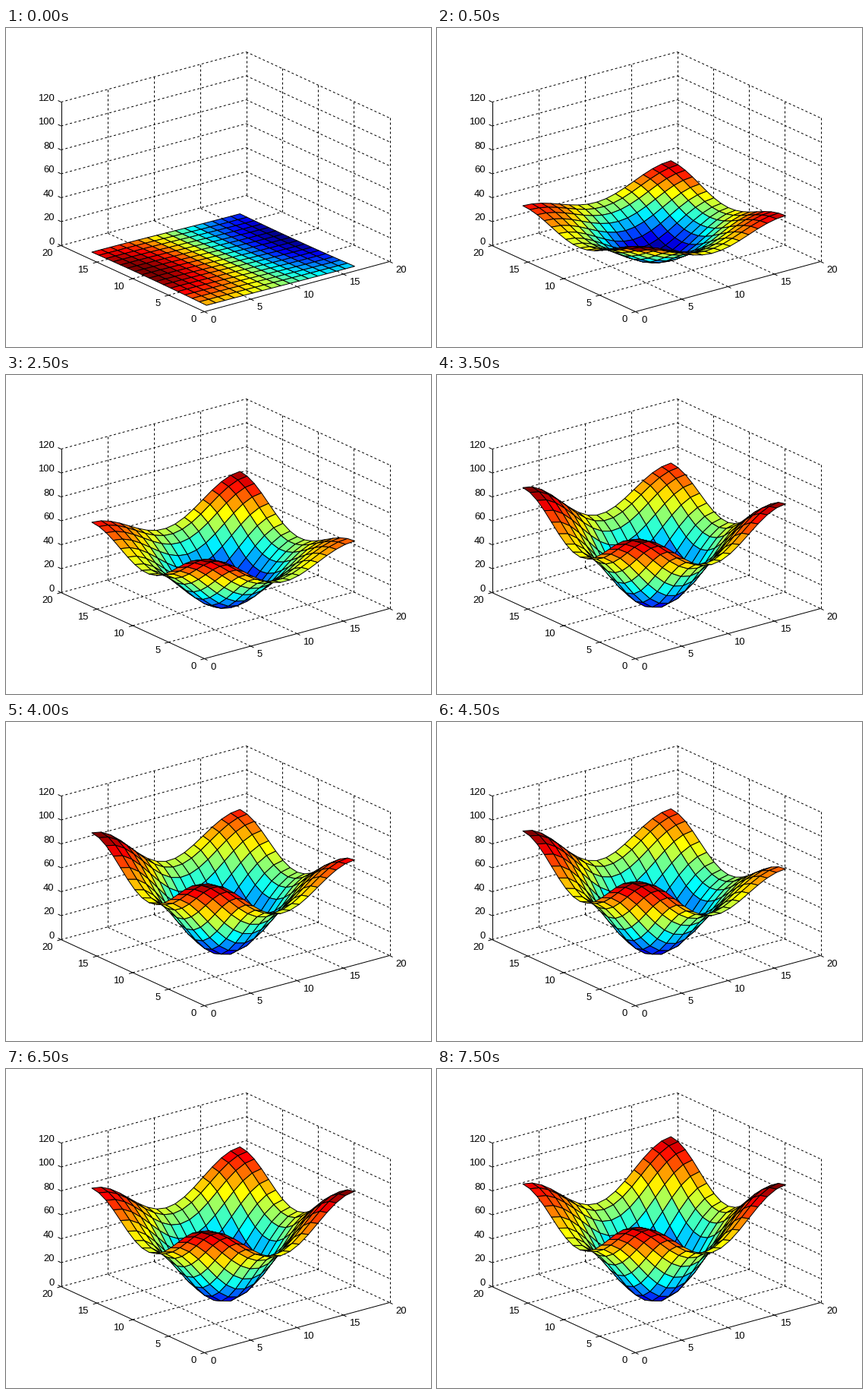
Recreate the animation shown at these times as a matplotlib script. Size 560 by 420 pixels, loop 8 s.

```python
import numpy as np
import matplotlib.pyplot as plt
from matplotlib.animation import FuncAnimation
from matplotlib.collections import LineCollection, PolyCollection

plt.rcParams.update({"font.family": "Liberation Sans", "font.size": 9.36})

W, H, DPI = 560, 420, 100
PX = 72 / DPI
STEPS, STEP_MS = 16, 500
N = 17

# Corner heights at key steps: front, right, back, left
CORNERS = {
    3: (77, 71, 74, 67),
    5: (76, 60, 74, 65),
    7: (93, 91, 81, 94),
    9: (97, 76, 82, 97),
    11: (92, 91, 81, 85),
    15: (98, 102, 98, 92),
}
EDGE = 0.62  # height of an edge's middle relative to its corners

I, J = np.meshgrid(np.arange(N), np.arange(N), indexing="ij")
U, V = I / 8 - 1, J / 8 - 1


def project(x, y, z):
    return (261 + 12.2 * x - 9.45 * y,
            373 - 3.3 * x - 4.35 * y - 1.575 * z)


def heights(step):
    """A slightly tilted sheet that turns into a bowl with four peaks."""
    if step == 0:
        return 1.2 * np.cos(np.pi * I / 16) * (1 - (J - 9) ** 2 / 130)

    growth = min(1, 0.38 + 0.21 * step)
    front, right, back, left = (growth * np.interp(step, list(CORNERS), c)
                                for c in zip(*CORNERS.values()))
    s, t = ((1 + np.sin(np.pi * w / 2)) / 2 for w in (U, V))
    peak = ((1 - t) * ((1 - s) * front + s * right)
            + t * ((1 - s) * left + s * back))
    a, b = (np.sin(np.pi * w / 2) ** 2 for w in (U, V))
    return peak * (EDGE * (a + b) + (1 - 2 * EDGE) * a * b)


def jet(t):
    t = (np.minimum(np.floor(t * 64), 63) + 1) / 64
    return np.stack([np.clip(1.5 - np.abs(4 * t - c), 0, 1)
                     for c in (3, 2, 1)], axis=-1)


fig = plt.figure(figsize=(W / DPI, H / DPI), dpi=DPI, facecolor="white")
ax = fig.add_axes([0, 0, 1, 1])
ax.set_xlim(-0.5, W - 0.5)
ax.set_ylim(H - 0.5, -0.5)
ax.axis("off")


def segment(a, b):
    return [project(*a), project(*b)]


def tick(point, dx, dy):
    x, y = project(*point)
    return [(x, y), (x + dx, y + dy)]


def label(point, dx, dy, value, align):
    x, y = project(*point)
    ax.text(x + dx, y + dy, str(value), ha=align, va="center", color="black")


grid, solid = [], []
for z in range(0, 121, 20):
    grid += [segment((0, 20, z), (20, 20, z)), segment((20, 20, z), (20, 0, z))]
    solid.append(tick((0, 20, z), -4, -2))
    label((0, 20, z), -9, -4.5, z, "right")
for v in range(0, 21, 5):
    if v:
        grid.append(segment((v, 20, 0), (v, 20, 120)))
    if v < 20:
        grid.append(segment((20, v, 0), (20, v, 120)))
    if 0 < v < 20:
        grid += [segment((v, 0, 0), (v, 20, 0)), segment((0, v, 0), (20, v, 0))]
    solid += [tick((v, 0, 0), 4, 2), tick((0, v, 0), -5, 1.4)]
    label((v, 0, 0), 8, 11.5, v, "left")
    label((0, v, 0), -11, 11, v, "right")
solid += [segment((0, 20, 0), (0, 20, 120)),
          segment((0, 20, 0), (0, 0, 0)),
          segment((0, 0, 0), (20, 0, 0))]

ax.add_collection(LineCollection(grid, colors="black", linewidths=PX,
                                 linestyles=[(0, (3, 3))]))
ax.add_collection(LineCollection(solid, colors="black", linewidths=PX))
surface = PolyCollection([], edgecolors="black", linewidths=PX, zorder=3)
ax.add_collection(surface)


def draw(step):
    z = heights(step)
    pts = np.stack(project(I + 1, J + 1, z), axis=-1)
    quads = np.stack([pts[:-1, :-1], pts[1:, :-1], pts[1:, 1:], pts[:-1, 1:]],
                     axis=2)
    shade = jet((z - z.min()) / (z.max() - z.min()))[:-1, :-1]
    # Farthest cells first
    surface.set_verts(quads[::-1, ::-1].reshape(-1, 4, 2))
    surface.set_facecolor(shade[::-1, ::-1].reshape(-1, 3))
    return [surface]


anim = FuncAnimation(fig, draw, frames=STEPS, interval=STEP_MS,
                     repeat=True, repeat_delay=0, blit=False)
plt.show()
```
